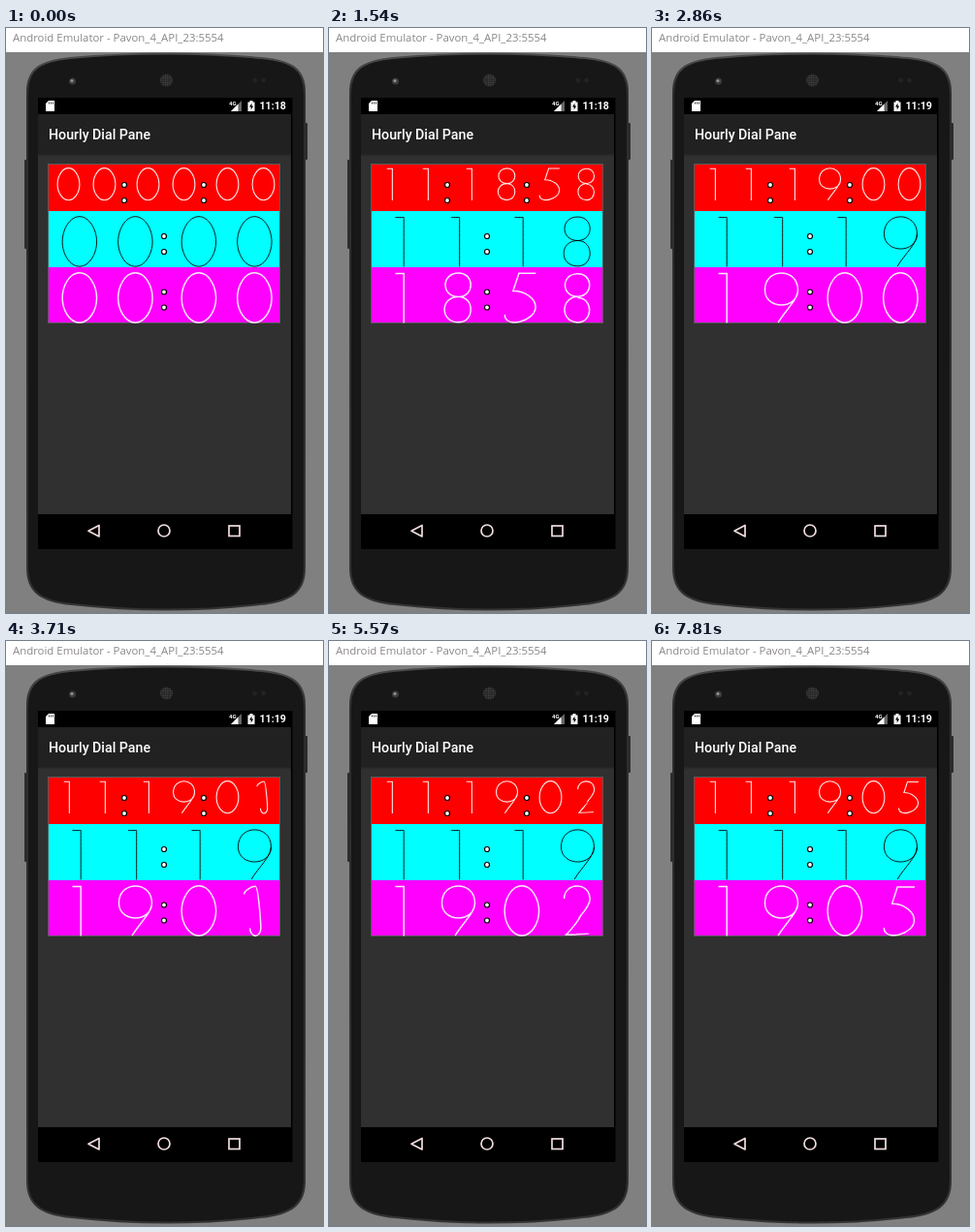
Write an HTML page that moves like this. It is 327 by 604 pixels and loops after 8000 ms.

```html
<!DOCTYPE html>
<html lang="en">
<head>
<meta charset="utf-8">
<title>Clock digits</title>
<style>
  html, body { margin: 0; width: 100%; height: 100%; overflow: hidden; background: #808080; }
  svg { display: block; }
  .title { font: 11.4px "Open Sans", sans-serif; fill: #8b8686; }
  .head { font: 500 14.2px Roboto, sans-serif; fill: #fff; }
  .clock { font: 700 10.6px Roboto, sans-serif; fill: #fff; }
  .net { font: 700 6px Roboto, sans-serif; fill: #fff; }
  .digit { fill: none; }
</style>
</head>
<body>
<svg width="327" height="604" viewBox="0 0 327 604">
  <defs>
    <linearGradient id="rim" x1="0" y1="0" x2="0" y2="1">
      <stop offset="0" stop-color="#4c4c4c"/>
      <stop offset=".08" stop-color="#2c2c2c"/>
      <stop offset="1" stop-color="#333"/>
    </linearGradient>
    <linearGradient id="shade" x1="0" y1="0" x2="0" y2="1">
      <stop offset="0" stop-color="#242424"/>
      <stop offset="1" stop-color="#303030"/>
    </linearGradient>
    <pattern id="mesh" width="2.4" height="2.4" patternUnits="userSpaceOnUse">
      <rect width="2.4" height="2.4" fill="#222"/>
      <circle cx="1.2" cy="1.2" r=".8" fill="#4a4a4a"/>
    </pattern>
  </defs>

  <rect width="327" height="25" fill="#fff"/>
  <text class="title" x="7" y="13.7">Android Emulator - Pavon_4_API_23:5554</text>

  <!-- phone -->
  <rect x="19" y="136" width="4" height="92" rx="1" fill="#2c2c2c"/>
  <rect x="307" y="98" width="4" height="38" rx="1" fill="#2c2c2c"/>
  <path d="M22 66C22 42 36 34 66 31Q165 22 264 31C294 34 308 42 308 66V558C308 582 294 592 262 595Q165 606 68 595C36 592 22 582 22 558Z"
        fill="#171717" stroke="url(#rim)" stroke-width="2"/>
  <circle cx="68.5" cy="55" r="3.5" fill="#3c3c3c"/>
  <circle cx="68" cy="54.5" r="1.5" fill="#959595"/>
  <circle cx="165.5" cy="54" r="6.5" fill="url(#mesh)"/>
  <circle cx="256.5" cy="54" r="2.5" fill="#222"/>
  <circle cx="265.5" cy="54" r="2.5" fill="#222"/>

  <!-- screen -->
  <rect x="33" y="72" width="262.5" height="466" fill="#000"/>
  <rect x="33" y="89" width="261" height="41" fill="#212121"/>
  <rect x="33" y="130" width="261" height="372" fill="#303030"/>
  <rect x="33" y="130" width="261" height="3" fill="url(#shade)"/>
  <text class="head" x="44" y="115">Hourly Dial Pane</text>

  <!-- status bar -->
  <path d="M44 75H50V86H41V78Z" fill="#fff"/>
  <path d="M44.5 76.5v2M46.5 76.5v2M48.5 76.5v2" stroke="#000" stroke-width=".8"/>
  <path d="M243 75V86H232Z" fill="#666"/>
  <path d="M239.5 78.5V86H232Z" fill="#fff"/>
  <text class="net" x="230" y="80">4G</text>
  <path d="M249.5 76.5h2V75h3v1.5h2V86h-7Z" fill="#fff"/>
  <path d="M253.5 77.5l-2.5 4h1.7v3l2.5-4h-1.7Z" fill="#000"/>
  <text class="clock" id="clock" x="261.5" y="84.2">11:18</text>

  <!-- navigation -->
  <g fill="none" stroke="#f2dede" stroke-width="1.7">
    <path d="M96 513.5V525L85 519.25Z" stroke-linejoin="round"/>
    <circle cx="163" cy="519" r="6"/>
    <rect x="230" y="514" width="11" height="10.5"/>
  </g>

  <rect x="43.5" y="140.5" width="239" height="164" fill="none" stroke="#777" stroke-opacity=".6"/>
  <g id="rows"></g>
  <path id="cursor" d="M.5 .5V16.500L4 13L6.500 18.500L8.800 17.500L6.400 12H11Z" fill="#fff" stroke="#000"/>
</svg>
<script>
const LOOP = 8000, FIRST = 500, SECOND = 1000, MORPH = 340;

// Steps of a digit: each takes the current point and returns one cubic's controls and end.
const line = (...q) => p => [p, q, q];
const sweep = (x, y) => ([a, b]) => [[a + (x - a) * .56, b], [x, y + (b - y) * .5], [x, y]];
const rise = (x, y) => ([a, b]) => [[a, b + (y - b) * .5], [x + (a - x) * .56, y], [x, y]];
const loop = (x, y, bulge) => ([a, b]) => [[a + bulge, b], [x + bulge, y], [x, y]];
const arch = (x, y, bulge) => ([a, b]) => [[a, b + bulge], [x, y + bulge], [x, y]];
const drop = (x, y) => ([a, b]) => [[a, b + (y - b) * .3], [x + (a - x) * .4, y + (b - y) * .4], [x, y]];

// Four cubics in a 1000-unit cell, padded so that any two digits can blend.
function digit(start, ...steps) {
  const pts = [start];
  for (const step of steps) pts.push(...step(pts[pts.length - 1]));
  while (pts.length < 13) pts.push(pts[pts.length - 1]);
  return pts;
}

const DIGITS = {
  0: digit([246, 552], rise(554, 99), sweep(862, 552), rise(554, 994), sweep(246, 552)),
  1: digit([425, 113], line(577, 113), line(577, 1000)),
  2: digit([309, 335], arch(798, 335, -315), drop(597, 674), line(315, 978), line(812, 978)),
  3: digit([362, 298], rise(550, 99), loop(550, 530, 285), loop(550, 994, 300), sweep(312, 790)),
  4: digit([856, 807], line(238, 807), line(713, 138), line(713, 989)),
  5: digit([807, 110], line(503, 110), line(398, 425), sweep(801, 713), arch(249, 851, 260)),
  8: digit([558, 530], loop(558, 105, -315), loop(558, 530, 293), loop(558, 989, -335), loop(558, 530, 293)),
  9: digit([851, 409], arch(260, 409, 360), arch(851, 409, -409), drop(497, 994))
};

// skip = leading digits of hhmmss that the row leaves out
const ROWS = [
  { y: 141, h: 48, count: 6, skip: 0, fill: '#f00', ink: '#fff', width: 1.1 },
  { y: 189, h: 58, count: 4, skip: 0, fill: '#0ff', ink: '#000', width: 1 },
  { y: 247, h: 57, count: 4, skip: 2, fill: '#f0f', ink: '#fff', width: 1.5 }
];
const LEFT = 44, WIDTH = 238, GAP = 8;

const $ = id => document.getElementById(id);
const add = (tag, attrs) => {
  const el = document.createElementNS('http://www.w3.org/2000/svg', tag);
  for (const k in attrs) el.setAttribute(k, attrs[k]);
  return $('rows').appendChild(el);
};

const glyphs = [];
for (const { y, h, count, skip, fill, ink, width } of ROWS) {
  const cell = (WIDTH - GAP * (count / 2 - 1)) / count;
  add('rect', { x: LEFT, y, width: WIDTH, height: h, fill });
  for (let i = 0; i < count; i++) {
    const x = LEFT + i * cell + Math.floor(i / 2) * GAP;
    if (i && i % 2 === 0)
      for (const side of [-8, 8])
        add('circle', { cx: x - GAP / 2, cy: y + h / 2 + 5 + side, r: 2.5, fill: '#fff', stroke: '#000', 'stroke-width': 1.2 });
    const el = add('path', { class: 'digit', stroke: ink, 'stroke-width': width, 'stroke-opacity': .9 });
    glyphs.push({ el, x, y, scale: cell / 1000, index: skip + i });
  }
}

const ease = u => .5 - Math.cos(u * Math.PI) / 2;
const mix = (a, b, p) => a + (b - a) * p;
const clamp = u => Math.max(0, Math.min(1, u));

// The view starts at zeros, then counts on from 11:18:58.
function clockAt(tick) {
  if (tick < 0) return '000000';
  const s = 11 * 3600 + 18 * 60 + 58 + tick;
  return [s / 3600, s / 60 % 60, s % 60].map(v => String(Math.floor(v)).padStart(2, '0')).join('');
}

function outline({ x, y, scale }, from, to, p) {
  const pts = from.map(([a, b], i) => [x + mix(a, to[i][0], p) * scale, y + mix(b, to[i][1], p) * scale]);
  return 'M' + pts[0] + 'C' + pts.slice(1).join(' ');
}

function drawPointer(t) {
  const shown = t >= 4080 && t < 5240;
  const p = clamp((t - 4080) / 230);
  const [x, y] = t < 5170 ? [mix(7, 154, p), mix(580, 582, p)] : [175, 586];
  $('cursor').setAttribute('visibility', shown ? 'visible' : 'hidden');
  $('cursor').setAttribute('transform', `translate(${x} ${y})`);
}

function draw(t) {
  const tick = Math.floor((t - FIRST) / SECOND);
  const from = clockAt(tick - 1), to = clockAt(tick);
  const p = ease(clamp((t - FIRST - tick * SECOND) / MORPH));
  for (const g of glyphs)
    g.el.setAttribute('d', outline(g, DIGITS[from[g.index]], DIGITS[to[g.index]], p));
  $('clock').textContent = t < 1620 ? '11:18' : '11:19';
  drawPointer(t);
}

const begin = performance.now();
function frame() {
  draw((performance.now() - begin) % LOOP);
  requestAnimationFrame(frame);
}
frame();
</script>
</body>
</html>
```
